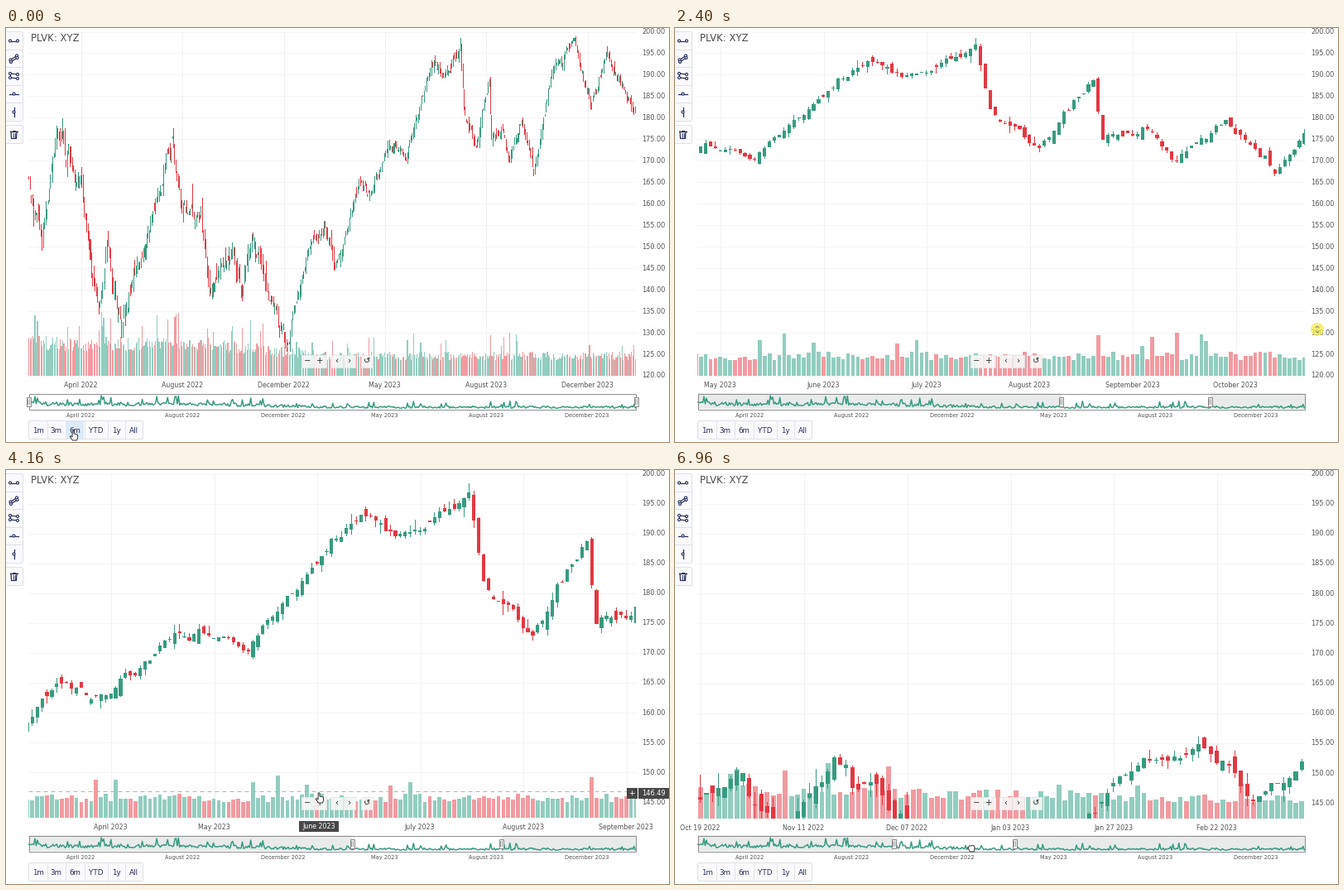
A matplotlib script for the animation above (7 s loop, 801 by 500 pixels).

```python
import numpy as np
import matplotlib.pyplot as plt
from matplotlib.animation import FuncAnimation
from matplotlib.collections import PolyCollection
from matplotlib.patches import Circle, FancyBboxPatch, Polygon, Rectangle

W, H = 801, 500
LEFT, RIGHT, TOP = 27, 761, 4
STEP, FRAMES = 40, 175
DAYS = 504
GREEN, RED = "#379b80", "#e23842"
PALE_GREEN, PALE_RED = "#92cdbf", "#f19ba1"
GREY, NAVY, DARK = "#555555", "#262c5c", "#474747"

plt.rcParams["font.family"] = "DejaVu Sans"
fig = plt.figure(figsize=(W / 100, H / 100), dpi=100, facecolor="white")
ax = fig.add_axes([0, 0, 1, 1])
ax.set_xlim(0, W)
ax.set_ylim(H, 0)
ax.axis("off")

# ---------- market data ----------
# main turns of the price as (day, price); seeded noise fills in the rest
TURNS = np.array([
    (0, 165), (11, 151), (23, 177), (43, 164), (58, 135), (66, 150), (77, 132),
    (119, 174), (127, 158), (143, 157), (150, 139), (169, 151), (176, 138),
    (185, 152), (214, 127), (236, 153), (246, 153), (254, 145), (276, 166),
    (281, 161), (299, 173), (312, 171), (337, 194), (343, 189), (358, 196),
    (361, 182), (371, 173), (382, 189), (384, 175), (392, 178), (399, 170),
    (409, 180), (419, 167), (434, 190), (453, 198), (466, 182), (479, 195),
    (503, 181)])
HOLIDAYS = [f"2022-{d}" for d in "04-15 05-30 06-20 07-04 09-05 11-24 12-26".split()]
HOLIDAYS += [f"2023-{d}" for d in "01-02 01-16 02-20 04-07 05-29 06-19 07-04".split()]
MONTHS = ("January February March April May June July August September "
          "October November December").split()

rng = np.random.default_rng(23)
day = np.arange(DAYS)
rough = np.interp(day, [0, 200, 290], [1.7, 1.3, 0.8])


def noise(size):
    return rng.normal(0, size, DAYS) * rough


close = np.interp(day, *TURNS.T) + np.convolve(noise(0.65), [1, 0.6, 0.36], "same")
open_ = np.r_[165, close[:-1]] + noise(0.75)
high = np.maximum(open_, close) + np.abs(noise(0.75))
low = np.minimum(open_, close) - np.abs(noise(0.75))
burst = (rng.random(DAYS) < 0.07) * rng.uniform(0.4, 1.1, DAYS)
volume = np.interp(day, [0, 150, 250], [40, 38, 24]) * (rng.uniform(0.75, 1.2, DAYS) + burst)
up = close >= open_
dates = np.busday_offset("2022-02-25", day, holidays=HOLIDAYS).astype(str)
body_colors = np.where(up, GREEN, RED)
bar_colors = np.where(up, PALE_GREEN, PALE_RED)


def date_label(i, daily=False):
    year, month, d = dates[int(np.clip(i, 0, DAYS - 1))].split("-")
    name = MONTHS[int(month) - 1]
    return f"{name[:3]} {d} {year}" if daily else f"{name} {year}"


# ---------- drawing helpers ----------
live = []


def keep(artist):
    live.append(artist)
    return artist


def text(x, y, s, size=8, color=GREY, ha="center", z=5):
    return ax.text(x, y + 0.365 * size, s, fontsize=size * 0.72, color=color,
                   ha=ha, va="baseline", zorder=z)


def rect(x0, y0, x1, y1, fill, edge="none", z=4, alpha=None):
    return ax.add_patch(Rectangle((x0, y0), x1 - x0, y1 - y0, fc=fill, ec=edge,
                                  lw=0.72, zorder=z, alpha=alpha))


def panel(x0, y0, x1, y1):
    ax.add_patch(FancyBboxPatch((x0, y0), x1 - x0, y1 - y0,
                                boxstyle="round,pad=0,rounding_size=2",
                                fc="#fafafc", ec="#dfe0e8", lw=0.72, zorder=3))


def line(xs, ys, color, lw=1.0, z=4, **kw):
    return ax.plot(xs, ys, color=color, lw=lw * 0.72, zorder=z, **kw)[0]


def link(x0, y0, x1, y1):
    """Tool icon stroke with a ring at each end."""
    line([x0, x1], [y0, y1], NAVY, 1.2, 5)
    for x, y in ((x0, y0), (x1, y1)):
        ring(x, y)


def ring(x, y):
    ax.add_patch(Circle((x, y), 1.5, fc="white", ec=NAVY, lw=0.8, zorder=6))


def boxes(x0, x1, y0, y1, colors, bottom, z):
    x0, x1 = np.clip(x0, LEFT, RIGHT), np.clip(x1, LEFT, RIGHT)
    y0, y1 = np.clip(y0, TOP, bottom), np.clip(y1, TOP, bottom)
    verts = np.stack([np.c_[x0, y0], np.c_[x1, y0], np.c_[x1, y1], np.c_[x0, y1]], axis=1)
    keep(ax.add_collection(PolyCollection(verts, facecolors=colors, edgecolors="none",
                                          zorder=z), autolim=False))


def overview_x(i):
    return LEFT + i * (RIGHT - LEFT) / DAYS


def ramp(t, start, length):
    return np.clip((t - start) / length, 0, 1)


# ---------- fixed parts ----------
def draw_toolbox():
    panel(-3, 4.5, 20.5, 112.5)
    panel(-3, 117.5, 20.5, 139.5)
    for k in range(1, 5):
        line([0, 20], [4 + 21.6 * k] * 2, "#dfe0e8")
    link(5, 15.5, 14, 15.5)
    link(5.5, 38.5, 13, 33.5)
    link(6, 41, 13.5, 36)
    link(5, 55, 14, 56)
    link(5, 60, 14, 61)
    line([5, 5], [55, 60], NAVY, 1.2, 5)
    line([4, 15], [79.5, 79.5], NAVY, 1.2, 5)
    line([9.5, 9.5], [96, 107], NAVY, 1.2, 5)
    ring(9.5, 79.5)
    ring(9.5, 101.5)
    line([5, 14], [125, 125], NAVY, 1.2)
    line([8, 8, 11, 11], [125, 123.5, 123.5, 125], NAVY)
    line([6, 6.5, 12.5, 13], [125, 133.5, 133.5, 125], NAVY, 1.2)
    for x in (8.5, 10.5):
        line([x, x], [127, 131.5], NAVY, 0.9)


def draw_ranges():
    panel(27.5, 474.5, 165.5, 496.5)
    x = 27.5
    for s, width in (("1m", 22), ("3m", 22), ("6m", 23), ("YTD", 28), ("1y", 21), ("All", 22)):
        if x > LEFT + 1:
            line([x, x], [475, 496], "#e3e4ea")
        text(x + width / 2, 485.5, s, 8.8, NAVY)
        x += width


draw_toolbox()
draw_ranges()
text(30, 11.5, "PLVK: XYZ", 11.6, "#4a4a4a", "left", 8)
line(overview_x(day + 0.5), 459.3 - (volume - 18) * 0.26, GREEN, 1.5, 5)
rect(27.5, 441.5, 760.5, 460.5, "none", "#909090", 6)
for i in range(43, DAYS, 84):
    text(overview_x(i + 0.5), 467.5, date_label(i), 6.6)

# ---------- motion ----------
STOPS = np.array([
    (0, 81, 486), (680, 81, 486), (1000, 94, 332), (1495, 559, 358), (2080, 776, 364),
    (2400, 776, 364), (2760, 776, 268), (3160, 300, 193), (3240, 250, 200),
    (3840, 446, 281), (4080, 378, 390), (4880, 378, 390), (5640, 455, 454),
    (6120, 284, 457), (6800, 284, 457), (6960, 358, 457)])
DRAGS = [(1000, 1495), (2240, 2760), (3240, 3840), (5600, 6320)]
LAG = 85


def cursor(t):
    time, xs, ys = STOPS.T
    return np.interp(t, time, xs), np.interp(t, time, ys)


def x_window(t):
    if t < 240:
        return 0, DAYS
    first = (380.2 - 78.4 * ramp(t, 1000, 495) - 33.1 * ramp(t, 3240, 600)
             + 11.9 * ramp(t, 4280, 200) - 117.6 * ramp(t, 5640, 700))
    return first, 123.8 - 23.8 * ramp(t, 4280, 200)


def y_window(t):
    zoom, pan = ramp(t, 2400, 360), ramp(t, 3240, 600)
    return 200 - 11.3 * (zoom - pan), 80 - 22.4 * zoom


def ticks(first, count):
    if count > 300:
        start, gap = 43, 84
    elif count > 110:
        start, gap = 12, 21
    else:
        start, gap = 10, 17
    return [i for i in range(start, DAYS, gap) if first <= i + 0.5 <= first + count]


def draw_chart(first, count, to_x, to_y, top, span, bottom):
    for i in ticks(first, count):
        x = np.floor(to_x(i)) + 0.5
        keep(line([x, x], [TOP, bottom], "#f2f2f2", 1, 0))
        keep(text(to_x(i), bottom + 12, date_label(i, count <= 110), 7.9))
    for p in range(100, 205, 5):
        if top - span - 0.1 <= p <= top + 0.1:
            y = to_y(p)
            keep(line([LEFT, RIGHT], [np.floor(y) + 0.5] * 2, "#f4f4f4", 1, 0))
            keep(text(768, y, f"{p:.2f}", 8.2, ha="left"))

    s = slice(max(0, int(first) - 1), min(DAYS, int(first + count) + 2))
    x = to_x(day[s])
    slot = (RIGHT - LEFT) / count
    boxes(x - 0.4 * slot, x + 0.4 * slot, bottom - volume[s], np.full(len(x), bottom),
          bar_colors[s], bottom, 1)
    a, b = to_y(np.maximum(open_, close)[s]), to_y(np.minimum(open_, close)[s])
    boxes(x - 0.45, x + 0.45, to_y(high[s]), to_y(low[s]), body_colors[s], bottom, 2)
    boxes(x - 0.35 * slot, x + 0.35 * slot, a, np.maximum(b, a + 1), body_colors[s],
          bottom, 2.5)


def draw_overview(first, count):
    a, b = overview_x(first), overview_x(first + count)
    keep(rect(27, 441, a, 460, "#e8ebea", z=1))
    keep(rect(b, 441, 761, 460, "#e8ebea", z=1))
    for x in np.floor([a, b]):
        keep(rect(x - 2.5, 445.5, x + 2.5, 456.5, "#f4f4f4", "#8a8a8a", 7))
        for dx in (-0.7, 0.9):
            keep(line([x + dx] * 2, [448, 454], "#8a8a8a", 0.8, 8))


def draw_buttons(t, bottom):
    hidden = ramp(t, 800, 100) - ramp(t, 2100, 100) + ramp(t, 3080, 100) - ramp(t, 4000, 100)
    drop = 27 * hidden
    y0, y1 = 394.5 + drop, min(409.5 + drop, bottom)
    if y0 >= bottom:
        return
    for x, glyph in ((357, "−"), (372, "+"), (392, "‹"), (407.5, "›"), (428.5, "↺")):
        keep(rect(x, y0, x + 14.5, y1, "#fafafa", "#e6e6e6", 6, alpha=0.88))
        if drop < 12:
            keep(text(x + 7.3, 401.5 + drop, glyph, 10, "#2c2c2c", z=7))


def draw_legend(i):
    i = int(np.clip(i, 0, DAYS - 1))
    color = "#3f9c84" if up[i] else "#d9505a"
    values = [f"{v[i]:.2f}" for v in (open_, high, low, close)] + [f"{volume[i] * 2:.2f}M"]
    x = 96
    for name, value in zip(("O", "H", "L", "C", "Vol"), values):
        gap = 14 if name == "Vol" else 8
        keep(text(x, 10, name, 7.8, "#8a6a6c", "left", 8))
        keep(text(x + gap, 10, value, 8, color, "left", 8))
        x += 44


def draw_crosshair(t, first, count, to_y, top, span, bottom):
    press = next((a for a, b in DRAGS if a <= t < b), None)
    dragging = press is not None
    x, y = cursor(press if dragging else t - LAG)
    if 4440 <= t < 4920 or not (LEFT < x < RIGHT and TOP < y < bottom):
        return
    yl = np.floor(y) + 0.5
    keep(line([LEFT, 750], [yl, yl], "#b5b5b5", 1, 6, dashes=(5, 4)))
    label_y = np.clip(cursor(press if dragging else t)[1], 8, bottom)
    price = top - (label_y - TOP) * span / (bottom - TOP)
    keep(rect(750, label_y - 6.5, 762.5, label_y + 6.5, DARK, z=8))
    keep(rect(764, label_y - 6.5, 801, label_y + 6.5, DARK, z=8))
    keep(text(756.3, label_y, "+", 9, "white", z=9))
    keep(text(768, label_y, f"{price:.2f}", 8.2, "white", "left", 9))
    if dragging:
        return
    scale = count / (RIGHT - LEFT)
    mark = cursor(t - 0.8 * LAG)[0]
    if mark < RIGHT:
        s = date_label(first + (mark - LEFT) * scale, count <= 110)
        half = len(s) * 2.43 + 2.5
        keep(rect(mark - half, 424, mark + half, 437, DARK, z=8))
        keep(text(mark, 430.5, s, 7.9, "white", z=9))
    # over the button strip only the level line stays
    if y < 360:
        keep(line([np.floor(x) + 0.5] * 2, [TOP, bottom], "#c8c8c8", 1, 6, dashes=(5, 4)))
        draw_legend(first + (x - LEFT) * scale)


ARROW = [(0, 0), (0, 8.5), (2, 6.8), (3.4, 10), (4.8, 9.3), (3.4, 6.3), (6, 6)]
HAND = [(-0.8, 0), (0.9, 0), (1, 4), (5.2, 5), (5.8, 8.5), (4.4, 12), (-0.5, 12),
        (-3.8, 7.5), (-2.8, 6.6), (-0.9, 8)]
GRAB = [(-4, 0), (-2.5, -3), (3, -3.5), (4.2, -1), (3.2, 4), (-1.5, 4)]


def draw_cursor(t):
    x, y = cursor(t)
    held = any(a <= t < b for a, b in DRAGS)
    if held:
        keep(ax.add_patch(Circle((x, y), 8, fc="#f5ec4e", ec="none", alpha=0.75, zorder=20)))
    if held and x > RIGHT:
        for d in (-1, 1):
            keep(line([x - 2, x, x + 2], [y + 2 * d, y + 4 * d, y + 2 * d], "#777", 0.9, 21))
        return
    if held or t >= 5560:
        shape = GRAB
    elif t < 760 or 4080 < t < 4920:
        shape = HAND
    else:
        shape = ARROW
    keep(ax.add_patch(Polygon(np.array(shape) + (x, y), fc="none" if held else "white",
                              ec="#333333", lw=0.7, zorder=21, ls=":" if held else "-")))


def draw(n):
    while live:
        live.pop().remove()
    t = n * STEP
    first, count = x_window(t)
    top, span = y_window(t)
    bottom = 420.5 if t >= 6200 else 419.5

    def to_x(i):
        return LEFT + (i + 0.5 - first) * (RIGHT - LEFT) / count

    def to_y(p):
        return TOP + (top - p) * (bottom - TOP) / span

    draw_chart(first, count, to_x, to_y, top, span, bottom)
    draw_overview(first, count)
    draw_buttons(t, bottom)
    draw_crosshair(t, first, count, to_y, top, span, bottom)
    if t < 760:
        keep(rect(72, 475, 94, 496, "#dcebf8", z=4))
    draw_cursor(t)
    return live


anim = FuncAnimation(fig, draw, frames=FRAMES, interval=STEP, repeat=True)
plt.show()
```
